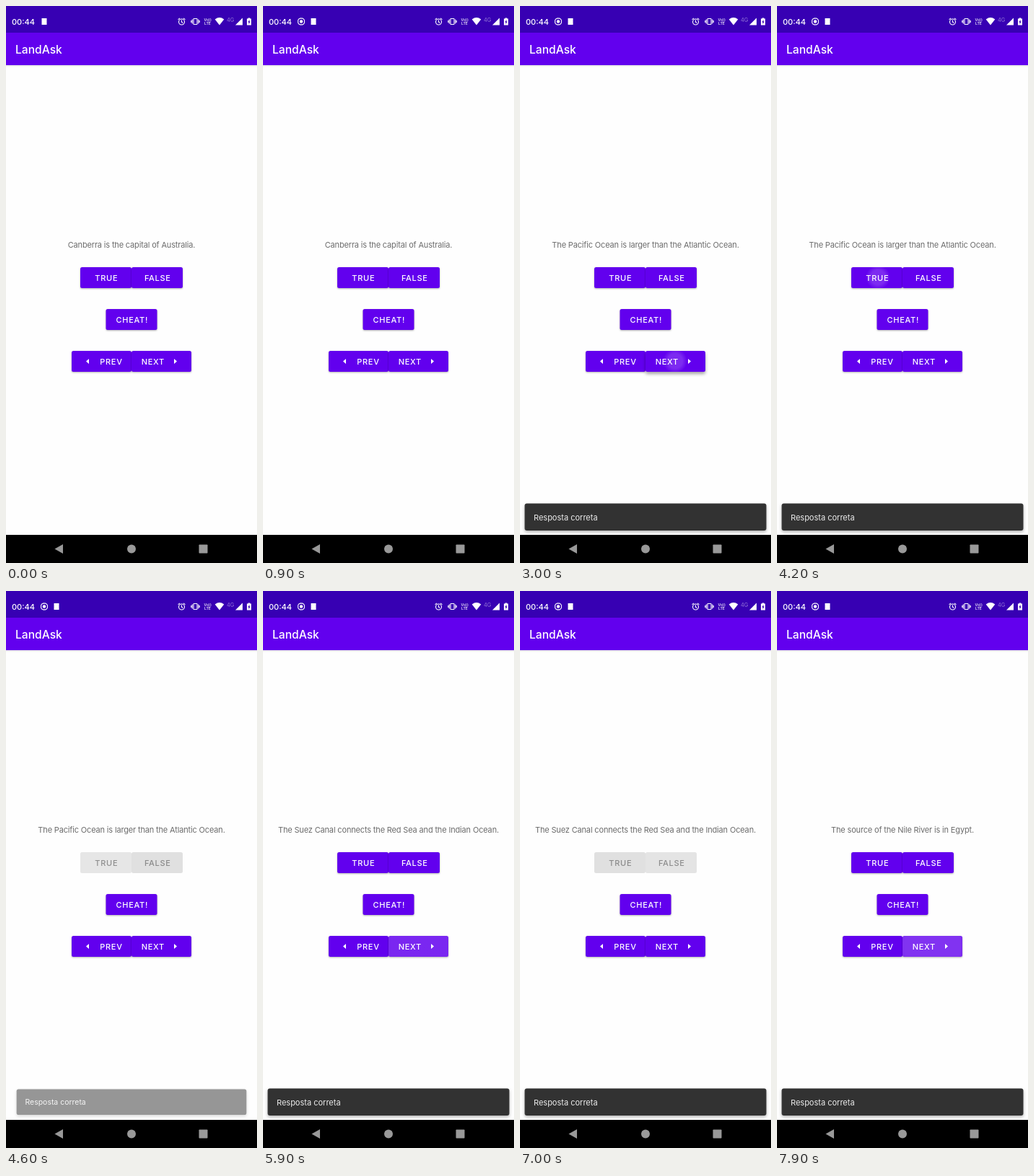
These frames come from a looping animation (348x772 px, 8000 ms). An HTML page:

```html
<!DOCTYPE html>
<html lang="en">
<head>
<meta charset="utf-8">
<title>LandAsk</title>
<style>
html, body { margin: 0; width: 100%; height: 100%; overflow: hidden; background: #fefefe; }
svg { display: block; width: 100%; height: 100%; }
text { font: 500 11px Inter, "Open Sans", sans-serif; }
#question { font-weight: 400; fill: #6c6c6c; letter-spacing: -.16px; text-anchor: middle; }
#labels text { fill: #fff; letter-spacing: .7px; text-anchor: middle; }
#labels .off { fill: rgba(0, 0, 0, .38); }
#buttons rect { fill: #6200ee; filter: drop-shadow(0 1px .8px rgba(0, 0, 0, .3)); }
#buttons .up { filter: drop-shadow(0 3px 2px rgba(0, 0, 0, .35)); }
#buttons .off { fill: #e0e0e0; filter: none; }
#snack rect { fill: #323232; filter: drop-shadow(0 2px 2px rgba(0, 0, 0, .3)); }
.line { fill: none; stroke: #fff; stroke-width: 1.1; }
</style>
</head>
<body>
<svg viewBox="0 0 348 772">
  <defs>
    <radialGradient id="glow">
      <stop offset=".6" stop-color="#fff"/>
      <stop offset="1" stop-color="#fff" stop-opacity="0"/>
    </radialGradient>
    <linearGradient id="edge" x2="0" y2="1">
      <stop stop-opacity=".1"/>
      <stop offset="1" stop-opacity="0"/>
    </linearGradient>
    <clipPath id="clip"><rect id="clipBox" height="29" rx="2.5"/></clipPath>
  </defs>

  <rect width="348" height="772" fill="#fefefe"/>
  <rect y="82" width="348" height="3" fill="url(#edge)"/>
  <rect width="348" height="82" fill="#6200ee"/>
  <rect width="348" height="37" fill="#3700b3"/>
  <text x="13" y="65.5" fill="#fff" style="font-size:15.6px">LandAsk</text>

  <!-- status bar -->
  <g fill="#fff">
    <text x="8" y="25.5" style="font-size:11px">00:44</text>
    <g id="record">
      <circle r="2.2"/>
      <path class="line" d="M-2 -4.3A4.7 4.7 0 0 0 -4.3 -2M2 -4.3A4.7 4.7 0 0 1 4.3 -2M-2 4.3A4.7 4.7 0 0 1 -4.3 2M2 4.3A4.7 4.7 0 0 0 4.3 2M-2 -4.4H2M-2 4.4H2M-4.4 -2V2M4.4 -2V2"/>
    </g>
    <rect id="app" x="-3.5" y="-4.5" width="7" height="9"/>
    <g class="line">
      <circle cx="243.5" cy="22" r="4"/>
      <path d="M243.5 19.5V22.3L245.3 23.5M238.6 18.8L241 16.8M248.4 18.8L246 16.8"/>
      <rect x="260" y="17.5" width="5" height="8" rx=".6"/>
      <path d="M258.2 18.5V24.5M256.8 20V23M266.8 18.5V24.5M268.2 20V23"/>
    </g>
    <text x="274.5" y="20.5" style="font-size:5.2px">Vo))</text>
    <text x="275" y="25.8" style="font-size:5.2px">LTE</text>
    <path d="M289.7 18.4Q296 13.8 302.3 18.4L296 26.4Z"/>
    <text x="306" y="21.5" fill-opacity=".45" style="font-size:7.4px;font-weight:400">4G</text>
    <path d="M318 26.5L328 16.5V26.5Z"/>
    <path fill-rule="evenodd" d="M335.7 16.4H338.3V17.5H340V26.6H334V17.5H335.7ZM337.5 19L335.4 22.6H336.6V25.3L338.7 21.6H337.5Z"/>
  </g>

  <text id="question" x="174" y="335"></text>
  <g id="buttons"></g>
  <g clip-path="url(#clip)"><circle id="ripple" fill="url(#glow)"/></g>
  <g id="labels"></g>
  <path fill="#fff" d="M115 489V496L111 492.500ZM233 489V496L237 492.500Z"/>

  <g id="snack">
    <rect x="6.500" y="689.500" width="335" height="37.500" rx="3"/>
    <text x="19" y="712.500" fill="#ececec" style="font-weight:400">Resposta correta</text>
  </g>

  <!-- navigation bar -->
  <rect y="733" width="348" height="39" fill="#000"/>
  <g fill="#999">
    <path d="M67.500 752.500L79 746V759Z"/>
    <circle cx="174" cy="752.500" r="6"/>
    <rect x="267.500" y="746.500" width="12" height="12" rx=".8"/>
  </g>
</svg>
<script>
const LOOP = 8000;
const $ = id => document.getElementById(id);
const clamp = v => Math.min(1, Math.max(0, v));
const ramp = (t, start, length) => clamp((t - start) / length);

function add(parent, tag, attrs) {
  const el = document.createElementNS("http://www.w3.org/2000/svg", tag);
  for (const k in attrs) el.setAttribute(k, attrs[k]);
  return parent.appendChild(el);
}
function set(el, attrs) {
  for (const k in attrs) el.setAttribute(k, attrs[k]);
}

function button(label, x, y, w, textX) {
  const box = add($("buttons"), "rect", { x, y, width: w, height: 29, rx: 2.5 });
  const text = add($("labels"), "text", { x: textX + .3, y: y + 18.7 });
  text.textContent = label;
  return { box, text, x, y, w };
}
const yes = button("TRUE", 103, 362, 71, 139);
const no = button("FALSE", 174, 362, 71, 210);
button("CHEAT!", 138.5, 420, 71, 174.5);
button("PREV", 91, 478, 83, 145.7);
const next = button("NEXT", 174, 478, 83, 203.5);

const questions = [
  [0, "Canberra is the capital of Australia."],
  [3000, "The Pacific Ocean is larger than the Atlantic Ocean."],
  [5400, "The Suez Canal connects the Red Sea and the Indian Ocean."],
  [7700, "The source of the Nile River is in Egypt."]
];
const answers = [1700, 4440, 6605];   // one per question
const snacks = [1707, 4525, 6688];
const taps = [                        // button, touch x, press, fade start
  [yes, 140, 1550, 1900],
  [next, 215, 2950, 3400],
  [yes, 140, 4150, 4700],
  [next, 215, 5360, 5830],
  [no, 210, 6350, 6900],
  [next, 215, 7660, 8200]
];

function drawStatus(t) {
  const p = ramp(t, 100, 350), e = p * p * (3 - 2 * p);
  set($("app"), { transform: `translate(${53 + 17 * e} 21.5)` });
  set($("record"), { transform: `translate(53 21.500) scale(${e})`, opacity: e });
}

function drawQuiz(t) {
  const i = questions.findLastIndex(q => t >= q[0]);
  const off = t >= answers[i];
  $("question").textContent = questions[i][1];
  for (const b of [yes, no])
    for (const el of [b.box, b.text]) el.classList.toggle("off", off);
}

function drawRipple(t) {
  const tap = taps.findLast(p => t >= p[2]);
  set($("ripple"), { opacity: 0 });
  next.box.classList.toggle("up", !!tap && tap[0] === next && t < tap[2] + 230);
  if (!tap) return;
  const [b, x, start, fade] = tap;
  set($("clipBox"), { x: b.x, y: b.y, width: b.w });
  set($("ripple"), {
    cx: x, cy: b.y + 14,
    r: 4 + 76 * ramp(t, start, 300),
    opacity: .2 * ramp(t, start, 60) * (1 - ramp(t, fade, 300))
  });
}

function drawSnack(t) {
  const i = snacks.findLastIndex(s => t >= s);
  const a = i < 0 ? 0 : ramp(t, snacks[i], 150);
  const out = ramp(t, answers[i + 1] ?? LOOP, 75);
  const scale = 1 - .2 * (1 - a) ** 2;
  set($("snack"), {
    opacity: i < 0 ? 0 : a * (1 - out),
    transform: `translate(174 708) scale(${scale}) translate(-174 -708)`
  });
}

function frame() {
  const t = performance.now() % LOOP;
  drawStatus(t);
  drawQuiz(t);
  drawRipple(t);
  drawSnack(t);
  requestAnimationFrame(frame);
}
frame();
</script>
</body>
</html>
```
